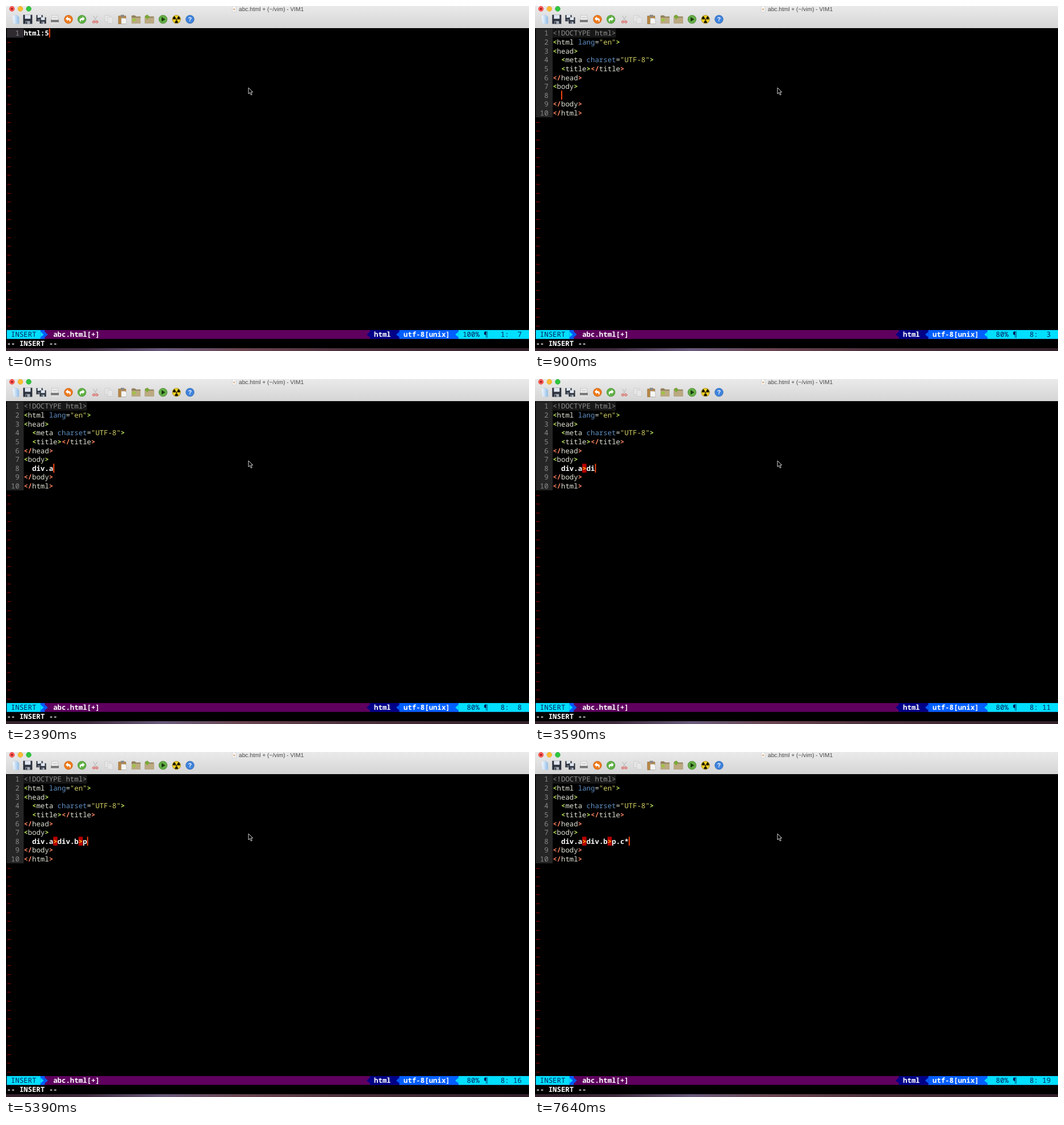
An HTML page that plays this animation: 921x608 px, repeating every 8 s.

```html
<!DOCTYPE html>
<html lang="en">
<head>
<meta charset="UTF-8">
<title>Editor typing</title>
<style>
html, body { margin: 0; width: 100%; height: 100%; overflow: hidden; background: #000; }
svg { display: block; width: 921px; height: 608px; }
.mono { font: 500 12.39px "Noto Sans Mono", "DejaVu Sans Mono", monospace; }
text { white-space: pre; text-rendering: geometricPrecision; }
.title { font: 10.2px "Liberation Sans", sans-serif; fill: #484848; }
</style>
</head>
<body>
<svg viewBox="0 0 921 608">
  <defs>
    <linearGradient id="bar" x2="0" y2="1"><stop stop-color="#eaeaea"/><stop offset="1" stop-color="#d5d5d5"/></linearGradient>
    <linearGradient id="desk">
      <stop stop-color="#35222b"/><stop offset=".15" stop-color="#3d2a3c"/><stop offset=".3" stop-color="#6a5a7c"/>
      <stop offset=".45" stop-color="#6a4550"/><stop offset=".65" stop-color="#4c303c"/><stop offset="1" stop-color="#33202a"/>
    </linearGradient>
    <linearGradient id="page"><stop stop-color="#fff"/><stop offset="1" stop-color="#8fbce8"/></linearGradient>
    <g id="folder">
      <path d="M-8-5l1-2h5l2 2h8v12H-8z" fill="#8f7f58"/>
      <path d="M-8-3H8V7H-8z" fill="#bba981"/>
    </g>
    <g id="disk">
      <path d="M-8-8H8V8H-8z" fill="#2c323d"/>
      <path d="M-5-8H5v7H-5z" fill="#dfe6ef"/>
      <path d="M-4 3H4v5H-4z" fill="#aab2bd"/>
      <path d="M-3 4h2v4h-2z" fill="#2c323d"/>
    </g>
  </defs>

  <rect width="921" height="608"/>
  <rect width="921" height="39" fill="url(#bar)"/>
  <rect y="603" width="921" height="5" fill="url(#desk)"/>

  <g stroke-width=".6">
    <circle cx="10.5" cy="5" r="4.4" fill="#fc5652" stroke="#dc3f3c"/>
    <circle cx="10.5" cy="5" r="1.5" fill="#7d0a08"/>
    <circle cx="25.3" cy="5" r="4.4" fill="#fdbc30" stroke="#dc9c23"/>
    <circle cx="40" cy="5" r="4.4" fill="#2fc63f" stroke="#1fa62d"/>
  </g>
  <path d="M398.500 0h4l2.500 2.500v8h-6.500z" fill="#f6f6f6" stroke="#bbb" stroke-width=".5"/>
  <circle cx="401.700" cy="6" r="1.400" fill="#d9a26a"/>
  <text class="title" x="410" y="8.700">abc.html + (~/vim) - VIM1</text>

  <g transform="translate(16 23.500)">
    <path d="M-5-7L3-8 7-4V8H-3z" fill="url(#page)" stroke="#c5ccd4" stroke-width=".5"/>
  </g>
  <use href="#disk" x="38.300" y="23.500"/>
  <g transform="translate(62 23.500)">
    <use href="#disk" transform="translate(-3 -2) scale(.7)"/>
    <use href="#disk" transform="translate(3 2) scale(.7)"/>
  </g>
  <g transform="translate(86 23.500)">
    <path d="M-5-7H5L6 1H-6z" fill="#fafafa" stroke="#999" stroke-width=".5"/>
    <path d="M-4-4H4M-4-2H4" stroke="#bbb"/>
    <path d="M-7 1H7V6H-7z" fill="#777"/>
    <path d="M-7 5H7V8H-7z" fill="#e2e2e2"/>
  </g>
  <g transform="translate(110 23.500)">
    <circle r="7.300" fill="#ee7a1b" stroke="#c05a0d" stroke-width=".7"/>
    <path d="M-5-1l4-4v2.500q5 0 5 3.500 0 2-2 4 1-4-3-4v2z" fill="#fff"/>
  </g>
  <g transform="translate(133.700 23.500)">
    <circle r="7.300" fill="#5fb043" stroke="#3f8a2a" stroke-width=".7"/>
    <path d="M5-1l-4-4v2.500q-5 0-5 3.500 0 2 2 4-1-4 3-4v2z" fill="#fff"/>
  </g>
  <g transform="translate(157.300 23.500) scale(.9)" fill="none">
    <path d="M-4-7L2 3M4-7L-2 3" stroke="#c2c2c2" stroke-width="1.500"/>
    <g stroke="#dc6f6c" stroke-width="1.800"><circle cx="-3" cy="5" r="2"/><circle cx="3" cy="5" r="2"/></g>
  </g>
  <g transform="translate(181 23.500)" fill="#e6e6e6" stroke="#c8c8c8" stroke-width=".7">
    <path d="M-7-7H2V4H-7z"/><path d="M-2-4H5L7-2V7H-2z"/>
  </g>
  <g transform="translate(205 23.500)">
    <path d="M-7-6H6V8H-7z" fill="#b88846" stroke="#86602c" stroke-width=".6"/>
    <path d="M-3-8H3V-4H-3z" fill="#888"/>
    <path d="M-2-2H5L7 0V8H-2z" fill="#f5f5f5" stroke="#aaa" stroke-width=".5"/>
  </g>
  <g transform="translate(229 23.500)">
    <use href="#folder"/>
    <path d="M-7 1l3.500-4v2.200h3v3.600h-3V5z" fill="#9bc63c"/>
  </g>
  <g transform="translate(252.500 23.500)">
    <use href="#folder"/>
    <path d="M-5-8v2.500h-2.500v2.500h2.500v2.500h2.500v-2.500h2.500v-2.500h-2.500v-2.500z" fill="#72ad2f"/>
  </g>
  <g transform="translate(276.500 23.500)">
    <circle r="7.300" fill="#65ad47" stroke="#48852f" stroke-width=".8"/>
    <path d="M-2.500-4L4 0l-6.500 4z" fill="#173b0d"/>
  </g>
  <g transform="translate(300.200 23.500)">
    <circle r="7.300" fill="#f2cf23" stroke="#927a12" stroke-width=".7"/>
    <path id="blade" d="M0 0L-6.500 0A6.500 6.500 0 0 1 -3.250-5.630z" fill="#181500"/>
    <use href="#blade" transform="rotate(120)"/><use href="#blade" transform="rotate(240)"/>
    <circle r="1.600" fill="#181500" stroke="#f2cf23" stroke-width=".8"/>
  </g>
  <g transform="translate(324 23.500)">
    <circle r="7.300" fill="#3f83dc" stroke="#285fa8" stroke-width=".7"/>
    <text y="3.800" text-anchor="middle" fill="#fff" font-family="Liberation Sans, sans-serif" font-size="10.500" font-weight="700">?</text>
  </g>

  <g id="screen" class="mono"></g>
  <path d="M427 144v10.800l2.500-2.300 1.900 4.300 1.900-.8-1.900-4.200h3.300z" fill="#000" stroke="#eee" stroke-width=".9"/>
</svg>
<script>
const CELL = 7.433, ROW = 15.62, LEFT = 1.4, TOP = 40, LOOP = 8000;
const GREEN = '#b8e05a', ORANGE = '#ff8562', NAME = '#e2e2d6';
const CYAN = '#00dfff', BLUE = '#005fff', NAVY = '#000087', PURPLE = '#5f005f', INK = '#00205a';
const page = `<!DOCTYPE html>
<html lang="en">
<head>
  <meta charset="UTF-8">
  <title></title>
</head>
<body>

</body>
</html>`.split('\n');
const abbr = 'div.a>div.b>p.c';

// [time, number of characters typed]
const keys = [[900, 0], [1800, 1], [1950, 2], [2100, 3], [2240, 4], [2390, 5], [3290, 6], [3590, 8],
  [3740, 9], [3890, 10], [4040, 11], [4640, 12], [5390, 13], [5690, 14], [5840, 15],
  [6890, 16], [7490, 15], [7640, 16]];
const cursorOff = [[1500, 1800], [3140, 3290], [6590, 6740]];

const colX = c => LEFT + c * CELL;
const rowY = r => TOP + r * ROW;
const esc = s => s.replace(/&/g, '&amp;').replace(/</g, '&lt;').replace(/>/g, '&gt;');
const span = (fill, s, weight = 500) =>
  `<tspan fill="${fill}" font-weight="${weight}">${esc(s)}</tspan>`;
const put = (r, c, body, fill = '#fff', weight = 500) =>
  `<text x="${colX(c)}" y="${rowY(r) + 12.4}" fill="${fill}" font-weight="${weight}">${body}</text>`;
const box = (r, c, w, fill, h = 1) =>
  `<rect x="${colX(c)}" y="${rowY(r)}" width="${w * CELL}" height="${h * ROW}" fill="${fill}"/>`;
// Triangle on the status row, pointing left (dir -1) or right (dir 1)
const arrow = (c, dir, fill) => {
  const y = rowY(34), x = colX(c);
  return `<path d="M${x} ${y + 3}L${x + dir * 5.5} ${y + ROW / 2}L${x} ${y + ROW - 3}z" fill="${fill}"/>`;
};

function paint(line) {
  if (line.startsWith('<!')) return span('#8f8f8f', line);
  return line.replace(/(<\/?)(\w+)([^>]*)>/g, (m, open, name, attr) => {
    const edge = open === '<' ? GREEN : ORANGE;
    const rest = attr.replace(/(\w+)=(".*")/, (m, key, val) =>
      span('#5f8fc4', key) + span(NAME, '=') + span('#d3d064', val));
    return span(edge, open, 700) + span(NAME, name) + rest + span(edge, '>', 700);
  });
}

function tildes(from) {
  let s = '';
  for (let r = from; r < 34; r++) s += put(r, 0, '<tspan dy="1">~</tspan>', '#c00000');
  return s;
}

function status(percent, line, col) {
  const place = `${percent.padStart(4)} ¶ ${String(line).padStart(3)}:${String(col).padStart(3)}`;
  return box(34, 0, 124, PURPLE) + box(34, 0, 8, CYAN) + box(34, 8, 1, BLUE) +
    arrow(8, 1, CYAN) + arrow(9, 1, BLUE) +
    box(34, 86, 7, NAVY) + arrow(86, -1, NAVY) +
    box(34, 93, 14, BLUE) + arrow(93, -1, BLUE) +
    box(34, 107, 17, CYAN) + arrow(107, -1, CYAN) +
    put(34, 1, 'INSERT', INK) + put(34, 11, 'abc.html[+]', '#fff', 600) +
    put(34, 87, 'html', '#fff', 600) + put(34, 94, 'utf-8[unix]', '#fff', 600) +
    put(34, 108, place, INK) + put(35, 0, '-- INSERT --', '#fff', 600);
}

const cursor = (r, c) =>
  `<rect x="${colX(c)}" y="${rowY(r)}" width="2" height="${ROW}" fill="#f4430c"/>`;

function start(pending) {
  return box(0, 0, 4, '#2e2a30') + put(0, 2, '1', '#8a8a8a') + put(0, 4, 'html:5', '#fff', 600) +
    cursor(0, 10) + tildes(1) + status('100%', 1, 7) + (pending ? put(35, 113, '^Y') : '');
}

function expanded(typed, shown) {
  let s = box(0, 0, 4, '#262626', 10) + box(0, 4, 15, '#171717');
  page.forEach((line, r) => {
    s += put(r, 1, String(r + 1).padStart(2), '#8a8a8a') + put(r, 4, paint(line));
  });
  const marked = [...typed].map((ch, i) => {
    const bad = '>&'.includes(ch);
    if (bad) s += box(7, 6 + i, 1, '#b80000');
    return span(bad ? '#ffb000' : '#fff', ch, 600);
  });
  s += put(7, 6, marked.join(''));
  if (shown) s += cursor(7, 6 + typed.length);
  return s + tildes(10) + status('80%', 8, 3 + typed.length);
}

function view(t) {
  if (t < 900) return start(t >= 450);
  const count = keys.filter(k => k[0] <= t).pop()[1];
  const text = abbr + (t < 7490 ? '&' : '*');
  return expanded(text.slice(0, count), !cursorOff.some(([a, b]) => t >= a && t < b));
}

const screenEl = document.getElementById('screen');
let last = '';
function frame() {
  const next = view(performance.now() % LOOP);
  if (next !== last) screenEl.innerHTML = last = next;
  requestAnimationFrame(frame);
}
frame();
</script>
</body>
</html>
```
